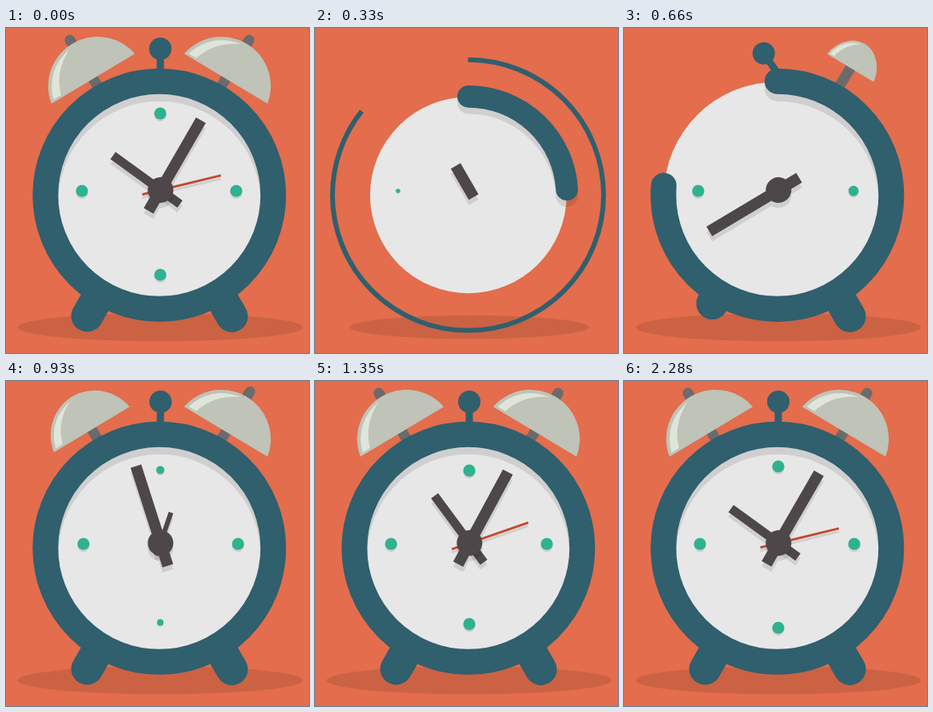
Animation, 379 px wide and 407 px high, one loop 2580 ms. Source, as an HTML page with a canvas:

```html
<!DOCTYPE html>
<html lang="en">
<head>
<meta charset="utf-8">
<title>Alarm clock</title>
<style>
  html, body { margin: 0; width: 100%; height: 100%; overflow: hidden; background: #e36d4c; }
  canvas { display: block; width: 379px; height: 407px; }
</style>
</head>
<body>
<canvas id="stage" width="379" height="407"></canvas>
<script>
const ctx = document.getElementById('stage').getContext('2d');
const LOOP = 2580, STEP = 30, TAU = Math.PI * 2, RAD = Math.PI / 180;
const BG = '#e36d4c', TEAL = '#305f6e', FACE = '#e7e7e7', DARK = '#4e4749';
const RED = '#c4492f', GREEN = '#2fb290', METAL = '#6c6a6a', SHADE = 'rgba(0,0,0,.105)';
const BODY = { x: 191.8, y: 209.3 }, PIVOT = { x: 193.3, y: 202.9 };

// Easing: progress through a time span, then its shape.
const phase = (t, start, span) => Math.min(1, Math.max(0, (t - start) / span));
const easeOut = (u, power = 3) => 1 - (1 - u) ** power;
const easeInOut = u => (1 - Math.cos(Math.PI * u)) / 2;
const backOut = u => 1 + 2 * (u - 1) ** 3 + (u - 1) ** 2;

function disc(x, y, r, color, ry = r) {
  ctx.fillStyle = color;
  ctx.beginPath();
  ctx.ellipse(x, y, r, ry, 0, 0, TAU);
  ctx.fill();
}

function line(x1, y1, x2, y2, width, color, cap = 'butt') {
  ctx.strokeStyle = color;
  ctx.lineWidth = width;
  ctx.lineCap = cap;
  ctx.beginPath();
  ctx.moveTo(x1, y1);
  ctx.lineTo(x2, y2);
  ctx.stroke();
}

function arc(x, y, r, turn, width, color, cap) {
  if (turn <= 0 || width <= 0) return;
  ctx.strokeStyle = color;
  ctx.lineWidth = width;
  ctx.lineCap = cap;
  ctx.beginPath();
  ctx.arc(x, y, r, -TAU / 4, (turn - 1 / 4) * TAU);
  ctx.stroke();
}

function placed(x, y, deg, draw) {
  ctx.save();
  ctx.translate(x, y);
  ctx.rotate(deg * RAD);
  draw();
  ctx.restore();
}

function shadow(t) {
  const s = easeOut(phase(t, 90, 528));
  disc(193, 374 + s * .8, 178.5 * s, SHADE, 17.5 * s);
}

// A thin circle that draws itself, expands and thins away.
function orbit(t) {
  const r = 186 * easeOut(phase(t, 30, 541));
  const turn = easeOut(phase(t, 30, 483), 2);
  arc(BODY.x - .4, BODY.y, r, turn, 6 * (1 - phase(t, 330, 210)), TEAL, 'butt');
}

function foot(x, y, side, t, start) {
  const hidden = 1 - easeOut(phase(t, start, 240));
  const inX = x - side * 30, inY = y - 52;
  line(inX, inY, x - side * 30 * hidden, y - 52 * hidden, 40, TEAL, 'round');
}

function domePath(w, h) {
  const r = (w * w + h * h) / (2 * h);
  ctx.beginPath();
  ctx.arc(0, r - h, r, Math.atan2(h - r, -w), Math.atan2(h - r, w));
  ctx.closePath();
}

function bell(x, deg, t, start) {
  if (t <= start) return;
  const s = backOut(phase(t, start, 341));
  const rod = 56.5 * backOut(phase(t, start, 500));
  placed(x, 63.5, deg, () => {
    line(0, 22, 0, -rod, 13, METAL, 'round');
    ctx.translate(0, -36 * (1 - s));
    ctx.scale(s, s ** .65);
    domePath(60.8, 51);
    ctx.fillStyle = '#bfc3b8';
    ctx.fill();
    ctx.fillStyle = '#e0e5d9';
    ctx.beginPath();
    ctx.moveTo(-56, -3);
    ctx.quadraticCurveTo(-45, -40, -6, -47);
    ctx.quadraticCurveTo(-36, -33, -45, -3);
    ctx.closePath();
    ctx.fill();
  });
}

function knob(t) {
  const size = easeOut(phase(t, 510, 120));
  const s = Math.max(0, t - 630);
  const swing = -52 * Math.exp(-s / 100) * Math.cos(TAU * s / 420);
  placed(193, 58, swing, () => {
    line(0, 0, 0, -32 * size, 9, TEAL);
    disc(0, -32 * size, 14 * size, TEAL);
  });
}

function body(t) {
  const s = backOut(phase(t, 150, 522));
  const turn = easeInOut(phase(t, 22, 943));
  const { x, y } = BODY, r = 142.5 * s, width = 32 * s;
  disc(x, y, 141.8 * s, FACE);
  ctx.save();
  ctx.beginPath();
  ctx.arc(x, y, r + width / 2, 0, TAU);
  ctx.clip();
  arc(x, y + 9 * s, r, turn, width, SHADE, 'round');
  ctx.restore();
  arc(x, y, r, turn, width, TEAL, 'round');
}

// Each dot pops in and bounces along its own radius until it settles.
function dot(x, y, dx, dy, t, start) {
  const r = 7.6 * easeOut(phase(t, start, 150), 2);
  const fade = (1 - phase(t, start, 1100)) ** 1.5;
  const off = -14 * fade * Math.cos(TAU * ((t - start) / 580 + 1 / 12));
  const px = x + dx * off, py = y + dy * off;
  disc(px, py + r * .3, r, SHADE);
  disc(px, py, r, GREEN);
}

function hand(deg, size, tip, tail, width, color, drop) {
  const draw = c => line(0, tail * size, 0, -tip * size, width, c);
  placed(PIVOT.x, PIVOT.y + drop, deg, () => draw(SHADE));
  placed(PIVOT.x, PIVOT.y, deg, () => draw(color));
}

function minuteHand(t) {
  const deg = 30 - 530 * (1 - easeOut(phase(t, 240, 1360), 3.4));
  const size = easeOut(phase(t, 270, 315), 2);
  const hub = 16 * backOut(phase(t, 390, 210));
  // One merged silhouette so overlapping shadows do not double up.
  const draw = (y, color) => placed(PIVOT.x, y, deg, () => {
    ctx.fillStyle = color;
    ctx.beginPath();
    ctx.rect(-7, -101 * size, 14, 131 * size);
    ctx.moveTo(hub, 0);
    ctx.arc(0, 0, hub, 0, TAU);
    ctx.fill();
  });
  draw(PIVOT.y + 6.5, SHADE);
  draw(PIVOT.y, DARK);
}

function hands(t) {
  const hour = backOut(phase(t, 870, 350));
  const second = backOut(phase(t, 1020, 270));
  if (hour > 0) {
    const deg = -54 + 85.4 * (1 - easeOut(phase(t, 870, 1170)));
    hand(deg, hour, 73.5, 30, 11 * Math.min(1, hour), DARK, 6);
  }
  if (second > 0) hand(70.8 + 5.6 * phase(t, 2190, 90), second, 77.7, 23.5, 3, RED, 4);
  minuteHand(t);
}

function render(t) {
  ctx.fillStyle = BG;
  ctx.fillRect(0, 0, 379, 407);
  shadow(t);
  orbit(t);
  if (t > 400) foot(282.5, 361, 1, t, 400);
  if (t > 580) foot(101.5, 360.5, -1, t, 580);
  bell(109, -31, t, 800);
  bell(275, 31, t, 600);
  knob(t);
  body(t);
  dot(95, 204, -1, 0, t, 300);
  dot(288, 204, 1, 0, t, 570);
  dot(193, 107, 0, -1, t, 865);
  dot(193, 309, 0, 1, t, 882);
  hands(t);
}

const start = performance.now();
function tick() {
  const t = (performance.now() - start) % LOOP;
  // The finished clock holds through the first step of each loop.
  render(t < STEP ? LOOP : Math.floor(t / STEP) * STEP);
  requestAnimationFrame(tick);
}
tick();
</script>
</body>
</html>
```
